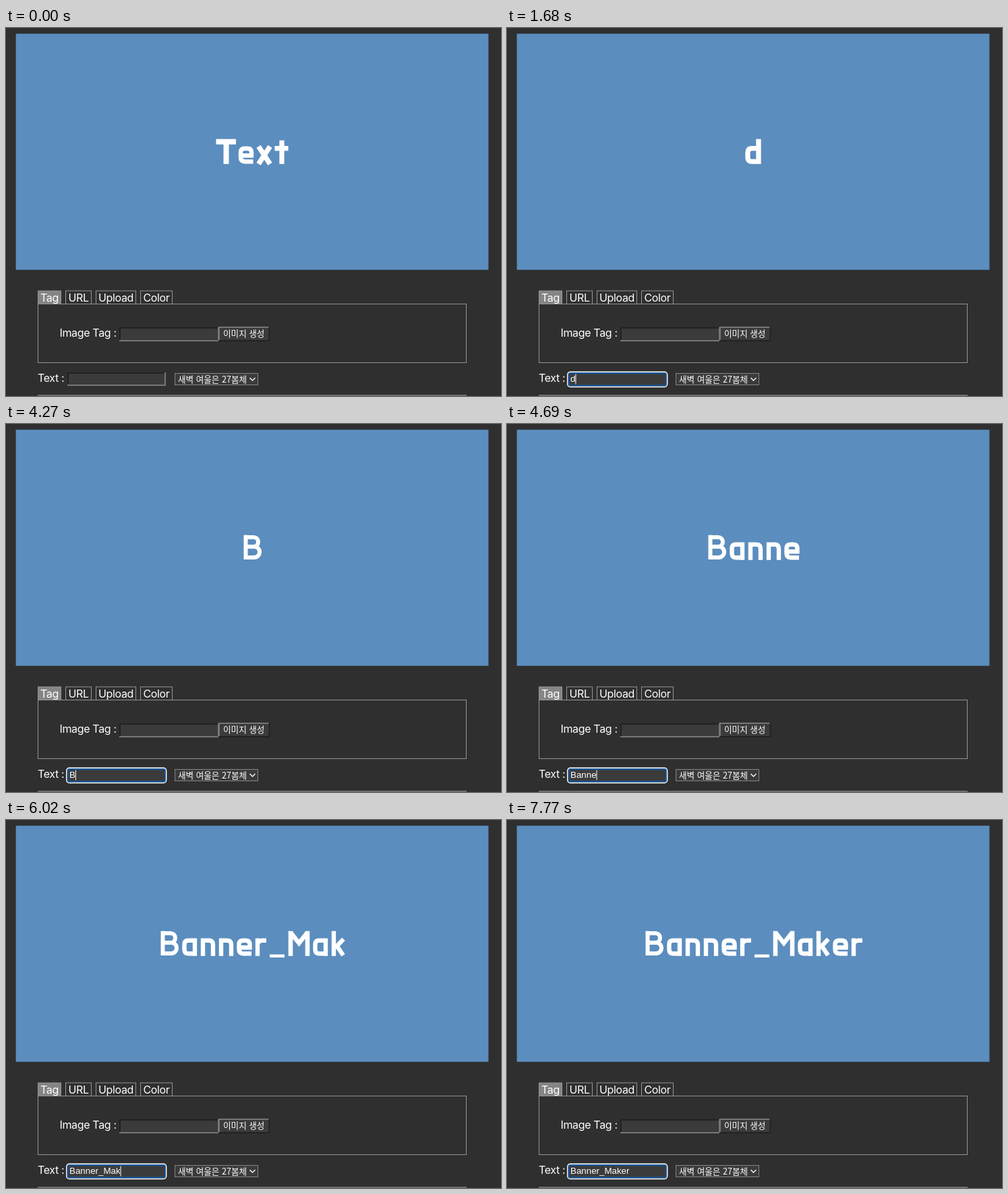
Animation of 734x546 px, one loop 8000 ms. Source, as an HTML page:

```html
<!DOCTYPE html>
<html lang="ko">
<head>
<meta charset="utf-8">
<title>Banner</title>
<style>
  html, body { margin: 0; width: 100%; height: 100%; overflow: hidden; background: #2f2f2f; }
  svg { display: block; width: 734px; height: 546px; }
  text { fill: #fff; font: 16px Inter, "Open Sans", sans-serif; letter-spacing: -.35px; white-space: pre; }
  .ko { font: 12.6px "Noto Sans CJK KR", "Noto Sans CJK", sans-serif; letter-spacing: 0; }
  #field { font: 13.33px "Liberation Sans", Arial, sans-serif; letter-spacing: 0; }
  .line { fill: none; stroke: #959595; }
  .light { fill: none; stroke: #767676; stroke-width: 2; }
  .dark { fill: none; stroke: #222; stroke-width: 2; }
  #banner { fill: none; stroke: #fff; }
</style>
</head>
<body>
<svg viewBox="0 0 734 546">
  <rect width="734" height="546" fill="#2f2f2f"/>
  <rect x="14.6" y="8.5" width="700.8" height="350.3" fill="#5b8dbe"/>
  <g id="banner" role="img"></g>

  <g id="tabs"></g>
  <rect class="line" x="47.5" y="409.5" width="635" height="87"/>
  <text x="79.5" y="458">Image Tag :</text>
  <text x="47" y="525">Text :</text>

  <rect x="168" y="444" width="148" height="21" fill="#3b3b3b"/>
  <path class="dark" d="M169 464V445H315"/>
  <path class="light" d="M168 464H315V444"/>
  <rect x="315" y="443" width="76.5" height="22" fill="#3b3b3b"/>
  <path class="light" d="M316 465V444H391"/>
  <path class="dark" d="M315 464H390.5V443"/>
  <text class="ko" x="322" y="457.5">이미지 생성</text>

  <rect x="91" y="511" width="146" height="20" fill="#3b3b3b"/>
  <g id="idle">
    <path class="dark" d="M92 531V512H236"/>
    <path class="light" d="M91 530H236V511"/>
  </g>
  <g id="focus" fill="none">
    <rect x="89.8" y="510.4" width="147.8" height="22" rx="4" stroke="#fff" stroke-width="1.6"/>
    <rect x="91.6" y="512.2" width="144.2" height="18.4" rx="2" stroke="#14569f" stroke-width="2"/>
  </g>
  <text id="field" y="525"></text>
  <rect id="caret" y="513.5" width="1" height="15" fill="#fff"/>

  <rect x="250.5" y="512.5" width="123" height="17" fill="#3b3b3b" stroke="#858585"/>
  <text class="ko" x="255" y="525.5">새벽 여울은 27봄체</text>
  <path d="M361.5 519l4 4 4-4" fill="none" stroke="#fff" stroke-width="1.3"/>
  <rect x="47" y="544" width="636" height="2" fill="#6e6e6e"/>

  <path id="arrow" d="M.5 .5V15l3.3-3 2.4 5.4 2.3-1-2.3-5.2H11z" fill="#000" stroke="#fff"/>
  <path id="beam" d="M-3-8.5q3 0 3 2.5 0-2.5 3-2.5M0-6V6M-3 8.5q3 0 3-2.5 0 2.5 3 2.5" fill="none" stroke="#fff"/>
</svg>
<script>
const $ = id => document.getElementById(id);
const LOOP = 8000, STEP = 70;

// Stroke font: [advance, path, stroke width]; cap top is 0, baseline 37
const FONT = {
  T: [33, 'M2 4H31.5M17 0V37', 8],
  e: [27, 'M24 33.5H12q-6.5 0-6.5-6.5v-7q0-6 6-6h4q6 0 6 6v4.5H6', 6.4],
  x: [27, 'M5 11 22 37M22 11 5 37', 7.5],
  t: [24, 'M12.5 2V37M2 14H22', 7.2],
  d: [28, 'M22 0V37M22 14H12q-6 0-6 6v7q0 6.5 6 6.5h10', 7.3],
  H: [35, 'M6.5 0V37M28 0V37M6 18H28', 7.5],
  i: [12, 'M5.5 0v7M5.5 11V37', 7.3],
  B: [34, 'M7.5 3.2H19a7 7 0 0 1 0 14H8M19 17.2h1a8 8 0 0 1 0 16H7.5V0', 6],
  a: [27, 'M21 10.8V37M21 14H11q-5.5 0-5.5 6v7q0 6.5 5.5 6.5h10', 6.4],
  n: [27, 'M6 10.8V37M6 14h9q6 0 6 6.5V37', 6.4],
  r: [21, 'M6 10.8V37M6 21q0-7 7-7h6', 6.4],
  _: [28, 'M3 37H25', 4.5],
  M: [37, 'M6 37V0M31 37V0M6 2 18.5 18 31 2', 6.6],
  k: [25, 'M6 0V37M20.5 12 8 25M10 21 20 36', 6.4]
};

// [time, field text, caret shown]
const TYPING = [
  [0, '', 0], [1260, '', 1], [1680, 'd', 1], [2100, '', 1], [2240, '', 0],
  [2520, 'H', 1], [2800, 'Hi', 1], [3290, 'Hi', 0], [3360, 'H', 0], [3500, '', 0],
  [3850, '', 1], [4270, 'B', 1], [4340, 'Ba', 1], [4480, 'Ban', 1], [4620, 'Bann', 1],
  [4690, 'Banne', 1], [4830, 'Banner', 1], [5250, 'Banner_', 1], [5600, 'Banner_M', 1],
  [5880, 'Banner_Ma', 1], [6020, 'Banner_Mak', 1], [6090, 'Banner_Make', 1],
  [6160, 'Banner_Maker', 1], [6720, 'Banner_Maker', 0], [7210, 'Banner_Maker', 1],
  [7280, 'Banner_Maker ', 1], [7770, 'Banner_Maker ', 0]
];

$('tabs').innerHTML = [['Tag', 47, 35], ['URL', 88, 39], ['Upload', 133, 60], ['Color', 199, 48]]
  .map(([name, x, w], i) =>
    `<rect class="line" x="${x + .5}" y="390" width="${w - 1}" height="19.5" ${i ? '' : 'style="fill:#858585"'}/>
     <text x="${x + w / 2}" y="406" text-anchor="middle">${name}</text>`).join('');

function setBanner(word) {
  if ($('banner').getAttribute('aria-label') === word) return;
  const glyphs = [...word].map(c => FONT[c]);
  let x = 365 - glyphs.reduce((sum, g) => sum + g[0], 0) / 2;
  $('banner').setAttribute('aria-label', word);
  $('banner').innerHTML = glyphs.map(([advance, path, width]) => {
    const part = `<path transform="translate(${x} 164.7)" d="${path}" stroke-width="${width}"/>`;
    x += advance;
    return part;
  }).join('');
}

// Sweep around the banner, rest in the middle, then go down to the field
function pointerAt(t) {
  const k = Math.floor(t / STEP);
  if (k < 1 || t >= 1680) return null;
  if (k < 10) {
    const angle = Math.PI * (.5 - 1.5 * (k - 1) / 8);
    return [381 + 323 * Math.cos(angle), 275 + 264 * Math.sin(angle)];
  }
  if (k < 11) return [240, 225];
  if (t < 1120) return [375, 198];
  if (t < 1190) return [290, 340];
  return [165, 526];
}

const show = (id, on) => $(id).style.display = on ? '' : 'none';

function draw(t) {
  const [, typed, caret] = TYPING.findLast(e => e[0] <= t);
  const focused = t >= 1260;
  setBanner(t < 1680 ? 'Text' : typed.trim());
  show('idle', !focused);
  show('focus', focused);

  const field = $('field');
  field.setAttribute('x', 94);
  if (field.textContent !== typed) field.textContent = typed;
  $('caret').setAttribute('x', 94 + (typed ? field.getComputedTextLength() : 0));
  show('caret', caret);

  const pos = pointerAt(t);
  show('arrow', pos && !focused);
  show('beam', pos && focused);
  if (pos) for (const id of ['arrow', 'beam']) $(id).setAttribute('transform', `translate(${pos})`);
}

const start = performance.now();
function tick(now) {
  draw(Math.max(0, now - start) % LOOP);
  requestAnimationFrame(tick);
}
draw(0);
requestAnimationFrame(tick);
</script>
</body>
</html>
```
